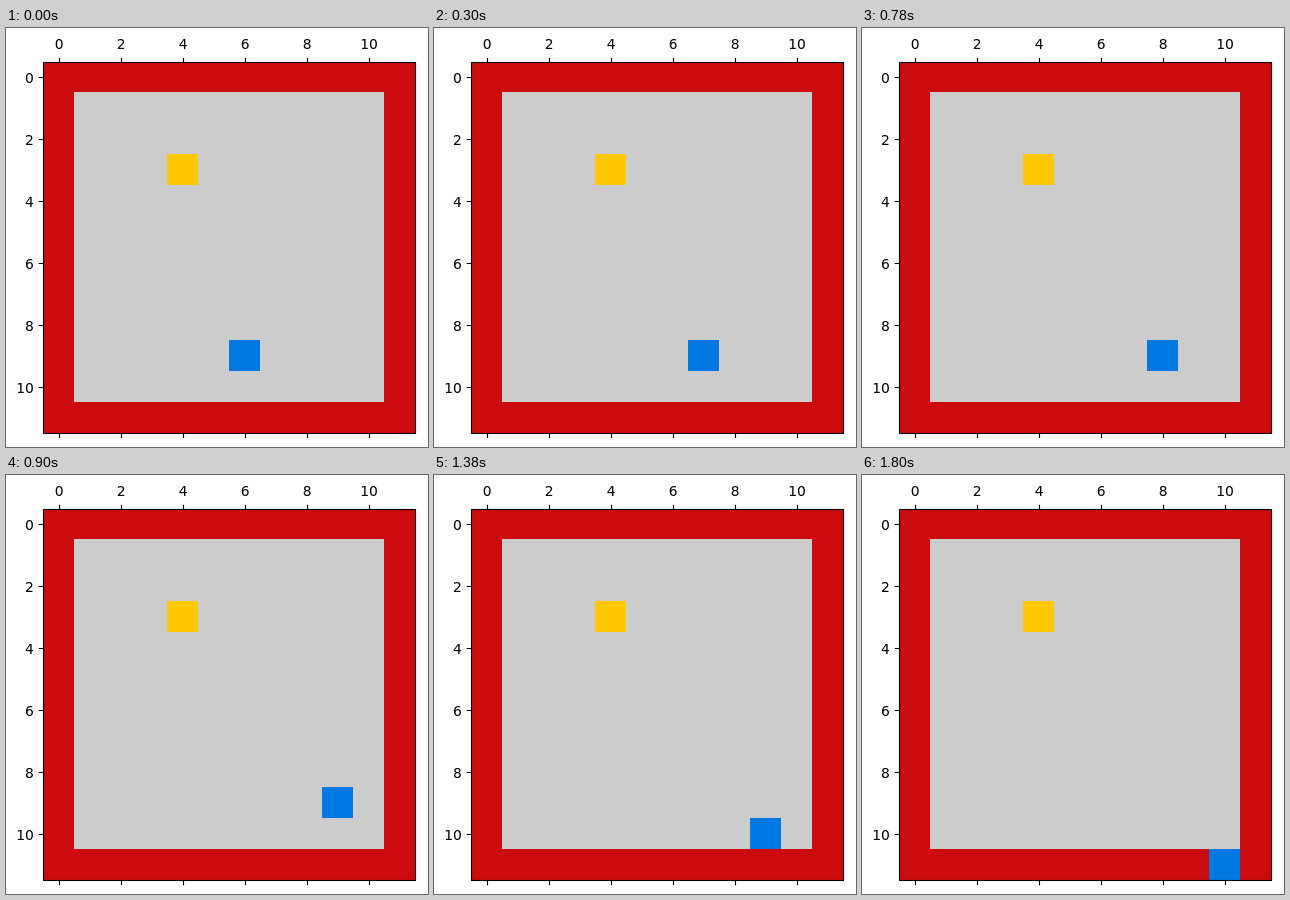
Recreate the animation shown at these times as an HTML page. Size 422x419 px, loop 2.1 s.

```html
<!DOCTYPE html>
<html lang="en">
<head>
<meta charset="utf-8">
<title>Grid walk</title>
<style>
  html, body { margin: 0; width: 100%; height: 100%; overflow: hidden; background: #fff; }
  svg { display: block; }
  text { font: 13.89px "DejaVu Sans", sans-serif; fill: #000; }
  .line { fill: none; stroke: #000; stroke-width: 1.11; }
</style>
</head>
<body>
<svg width="422" height="419" viewBox="0 0 422 419">
  <g shape-rendering="crispEdges">
    <rect x="37" y="34" width="372" height="371" fill="#cb0b0d"/>
    <rect x="68" y="64" width="310" height="310" fill="#ccc"/>
    <rect x="161" y="126" width="31" height="31" fill="#ffc800"/>
    <rect id="walker" width="31" height="31" fill="#0078e1"/>
  </g>
  <rect class="line" x="37.5" y="34.5" width="372" height="371"/>
  <g id="axes"></g>
</svg>
<script>
  const CELL = 31, LEFT = 37, TOP = 33, STEP_MS = 300;
  const path = [[6, 9], [7, 9], [8, 9], [9, 9], [9, 10], [10, 10], [10, 11]];
  const axes = document.getElementById('axes');
  const walker = document.getElementById('walker');

  function add(tag, attrs, label = '') {
    const el = document.createElementNS('http://www.w3.org/2000/svg', tag);
    for (const key in attrs) el.setAttribute(key, attrs[key]);
    el.textContent = label;
    axes.append(el);
  }

  for (let n = 0; n <= 10; n += 2) {
    const x = 53.5 + n * CELL, y = 49.5 + n * CELL;
    add('path', { class: 'line', d: `M${x} 34.5v-4.86M${x} 405.5v4.86M37.5 ${y}h-4.86` });
    add('text', { x: x - 0.4, y: 21, 'text-anchor': 'middle' }, n);
    add('text', { x: 27.8, y: y + 5, 'text-anchor': 'end' }, n);
  }

  const start = performance.now();
  function draw(now) {
    const step = Math.floor(Math.max(0, now - start) / STEP_MS) % path.length;
    const [col, row] = path[step];
    walker.setAttribute('x', LEFT + col * CELL);
    walker.setAttribute('y', TOP + row * CELL);
    requestAnimationFrame(draw);
  }
  draw(start);
</script>
</body>
</html>
```
